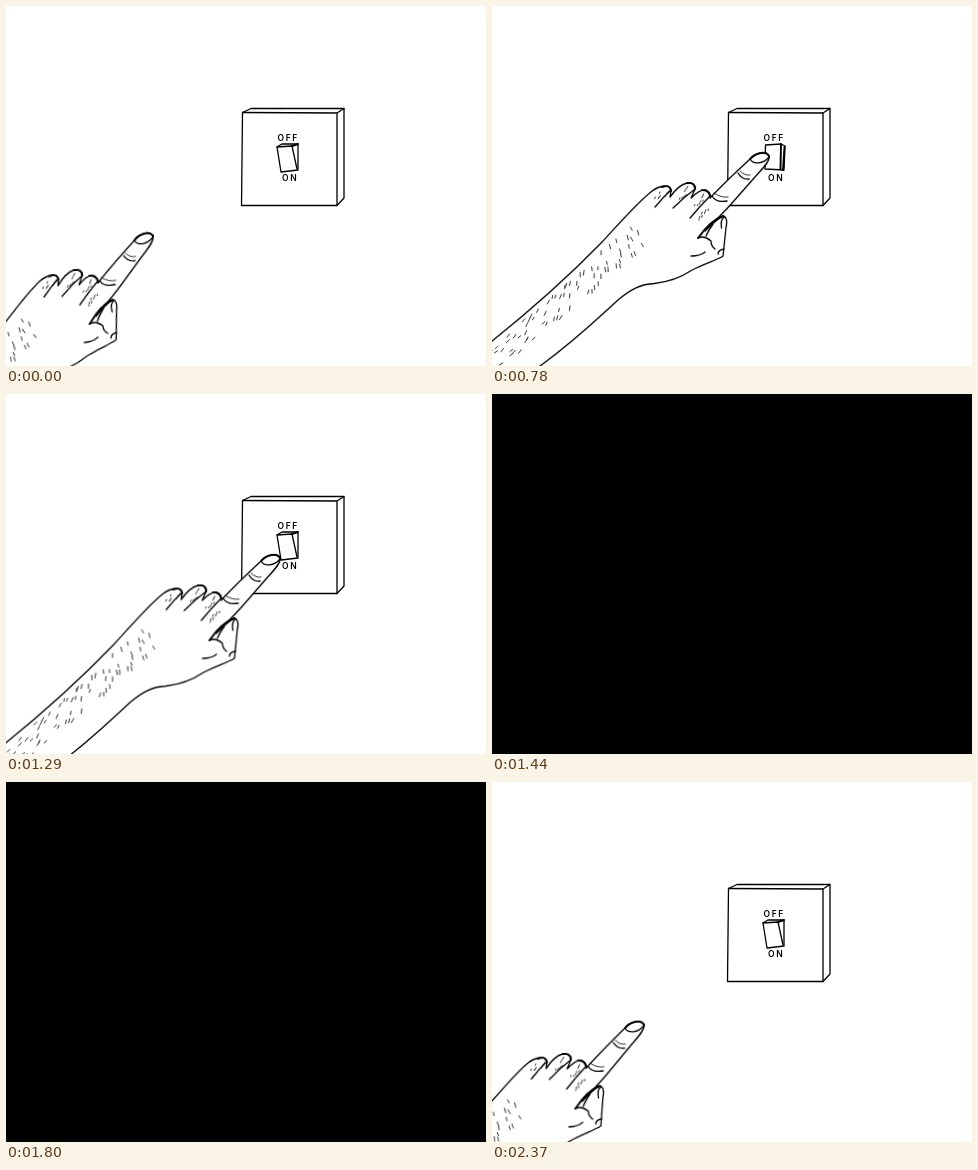
An HTML page for the animation above (2400 ms loop, 480 px wide and 360 px high).

```html
<!DOCTYPE html>
<html lang="en">
<head>
<meta charset="utf-8">
<title>Light switch</title>
<style>
  html, body { margin: 0; height: 100%; overflow: hidden; background: #fff; }
  svg { display: block; width: 100vw; height: 100vh; }
  path { fill: none; stroke: #000; stroke-width: 1.3; stroke-linecap: round; stroke-linejoin: round; }
  .body { fill: #fff; }
  .bold { stroke-width: 1.9; }
  .fine { stroke-width: .8; }
  text { font: 600 8.5px Inter, Roboto, sans-serif; letter-spacing: 1.6px; }

  #hand { transform-origin: 277px 150px; animation: reach 2400ms ease-in-out infinite; }
  #dark { animation: dark 2400ms step-end infinite; }
  #on { animation: on 2400ms step-end infinite; }
  #off { animation: off 2400ms step-end infinite; }

  /* offsets are measured from the fingertip resting on the rocker */
  @keyframes reach {
    0%      { transform: translate(-130px, 80px) rotate(-5.2deg); animation-timing-function: ease-out; }
    11.25%  { transform: translate(-146px, 54px) rotate(-9deg); }
    22.5%   { transform: translate(-133px, 39px) rotate(-7deg); animation-timing-function: ease-in-out; }
    31.25%  { transform: translate(-4px, 0) rotate(0deg); animation-timing-function: linear; }
    32.5%   { transform: translate(0, 0) rotate(0deg); }
    33.75%  { transform: translate(3px, 1px) rotate(0deg); }
    40%     { transform: translate(7px, 8px) rotate(0deg); animation-timing-function: ease-out; }
    42.5%   { transform: translate(9px, 11.5px) rotate(0deg); }
    45%, 46.25% { transform: translate(10px, 12px) rotate(0deg); }
    53.75%  { transform: translate(-3px, 14px) rotate(-.3deg); }
    57.5%   { transform: translate(0, 1px) rotate(0deg); }
    66.25%  { transform: translate(12px, 9px) rotate(0deg); }
    67.5%   { transform: translate(12px, 9.5px) rotate(0deg); }
    72.5%   { transform: translate(1px, 1px) rotate(0deg); }
    78.75%  { transform: translate(10px, 10px) rotate(0deg); }
    85%, 90% { transform: translate(-49px, 39px) rotate(0deg); }
    98.75%  { transform: translate(-125px, 93px) rotate(-1.6deg); animation-timing-function: linear; }
    100%    { transform: translate(-130px, 80px) rotate(-5.2deg); }
  }
  @keyframes dark {
    0%, 40%, 66.25%, 78.75%, 100% { visibility: hidden; }
    33.75%, 58.75%, 73.75% { visibility: visible; }
  }
  @keyframes on {
    0%, 40%, 66.25%, 78.75%, 100% { visibility: visible; }
    32.5%, 57.5%, 72.5% { visibility: hidden; }
  }
  @keyframes off {
    0%, 40%, 66.25%, 78.75%, 100% { visibility: hidden; }
    32.5%, 57.5%, 72.5% { visibility: visible; }
  }
</style>
</head>
<body>
<svg viewBox="0 0 480 360" preserveAspectRatio="none">
  <rect width="480" height="360" fill="#fff"/>

  <g id="plate">
    <path class="body" d="M236.500 106.500L245 102.500 338 102.500 338 192 331 199.500 235.500 199.500Z"/>
    <path d="M236.500 106.500L331 107 331 199.500M331 107L338 102.500"/>
    <text x="271.500" y="135">OFF</text>
    <text x="276" y="174.500">ON</text>
  </g>

  <g id="on">
    <path class="body" d="M271 141L276 138 292 138 292 164 275 166Z"/>
    <path d="M271 141L286 140 291 163"/>
    <path class="bold" d="M286 140L292 138"/>
  </g>
  <g id="off">
    <path class="body" d="M273.500 139L289 138 293 140 292 164 273 163Z"/>
    <path class="bold" d="M289 138L288.500 163M292.500 141L291 164"/>
  </g>

  <g id="hand">
    <path class="body" d="M-150 462L0 335C30 311 75 272 110 236C132 212 147 195 160 185
      C168 179 178 178 179 184L178 191C183 184 190 178 195 177C201 176 204 180 203 183L199 192
      C205 186 210 183 214 184Q218 186 218 190L218 192C230 179 245 165 258 153
      C263 147 274 144 277 150C279 155 268 165 262 172L240 197C232 206 222 216 213 225
      C221 217 228 210 232 210Q236 213 234 221L231 250C225 254 214 257 200 264
      C188 272 176 276 162 277.500C148 278 138 284 127 293C105 313 85 333 48 360L-90 470Z"/>
    <path d="M179 184Q171 191 163 201M203 183Q192 191 181 202M218 190Q208 200 198 212"/>
    <path class="bold" d="M170 181Q178 178 179 185M195 177Q203 176 203 183M210 184Q217 184 218 190
      M258 153C263 147 274 144 277 150M206 232Q219 214 231 210"/>
    <path d="M258 153C261 158.500 271 158.500 277 151"/>
    <path d="M246 167Q250 174 257 173M220 190Q224 197 235 195"/>
    <path class="fine" d="M248 165Q253 170 258 169M222 187Q229 192 236 191"/>
    <path d="M229.500 222Q228 214 232 211M206 232Q212 229 219 235
      M214 230Q216 225 221 218M219 235Q219 240 223 243M213 246Q208 250 199 250"/>
    <path d="M226 248Q226 244 232 243"/>
    <path id="hair" class="fine"/>
  </g>

  <rect id="dark" width="480" height="360"/>
</svg>
<script>
  let seed = 4321;
  const rand = () => (seed = (seed * 16807) % 2147483647) / 2147483647;
  const dash = (x, y, angle, len) =>
    `M${x.toFixed(1)} ${y.toFixed(1)}l${(Math.cos(angle) * len).toFixed(1)} ${(Math.sin(angle) * len).toFixed(1)}`;

  let hair = '';
  // forearm: a band running from the back of the hand to the elbow
  const count = 76;
  for (let i = 0; i < count; i++) {
    const u = (i + rand()) / count * 1.12;
    const off = (rand() - 0.5) * (28 - 8 * u);
    const angle = 1.15 + u * 1.3 + (rand() - 0.5) * 0.4;
    hair += dash(148 - 138 * u + off * 0.7, 227 + 120 * u + off * 0.75, angle, 3 + rand() * 2);
  }
  // fingers
  for (const [x, y] of [[170, 188], [193, 187], [208, 194], [211, 207]]) {
    for (let i = 0; i < 7; i++) {
      const along = (i - 3) * 1.6, across = (rand() - 0.5) * 8;
      hair += dash(x - along + across * 0.6, y + along + across * 0.6, 1.9, 1.2 + rand());
    }
  }
  document.getElementById('hair').setAttribute('d', hair);
</script>
</body>
</html>
```
